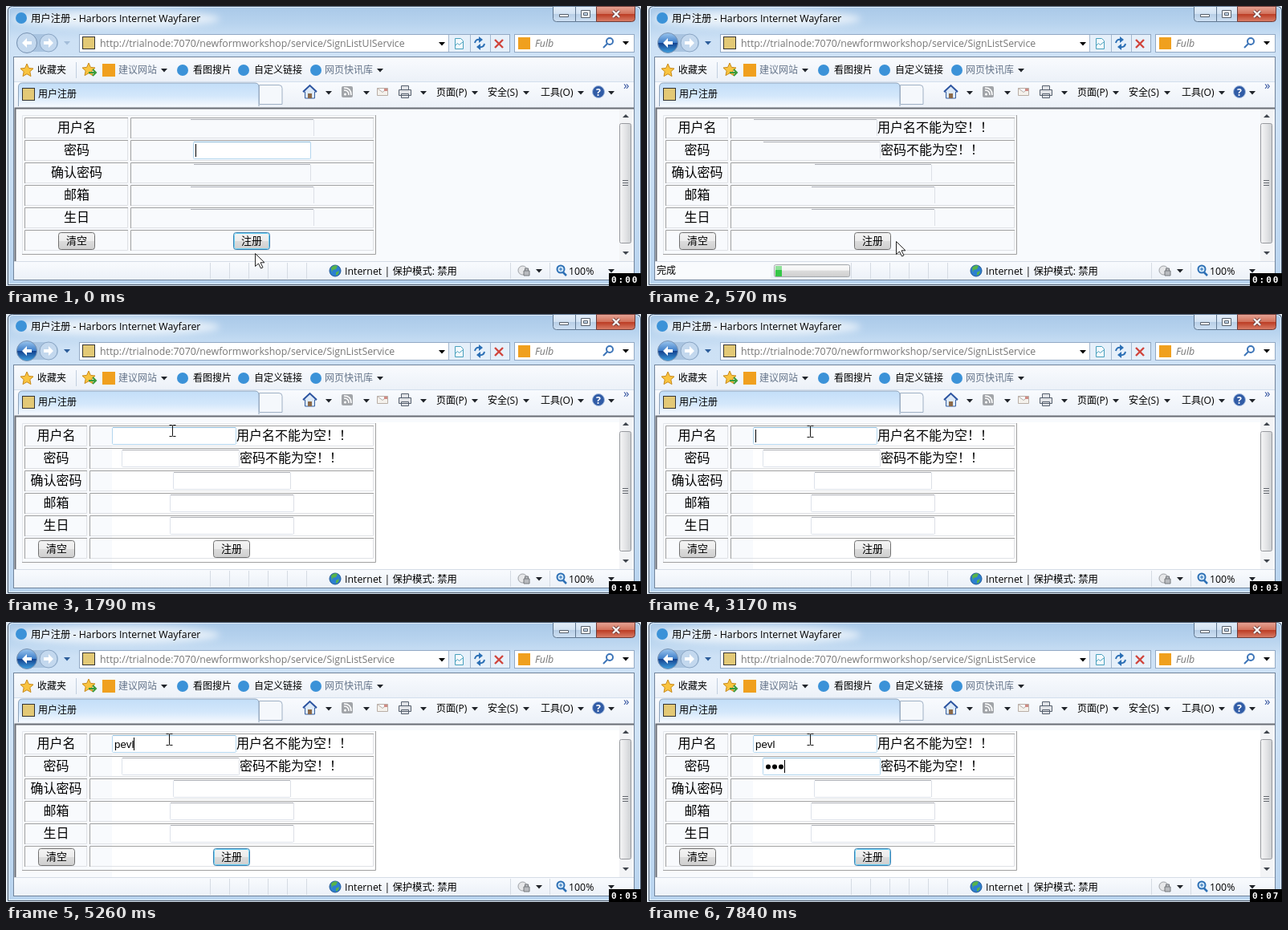
An HTML page that plays this animation: 791x349 px, repeating every 8000 ms.

```html
<!DOCTYPE html>
<html lang="zh-CN">
<head>
<meta charset="utf-8">
<title>用户注册</title>
<style>
html, body { margin: 0; width: 100%; height: 100%; overflow: hidden; background: #dfe8f1 }
svg { display: block }
text { font: 12.35px "Open Sans", "Noto Sans CJK SC", "Noto Sans CJK", sans-serif; white-space: pre }
.ui text { font-size: 12px }
.soft { fill: #66758a }
.url { fill: #777 }
.form text { font: 300 16px "Noto Sans CJK SC", "Noto Sans CJK", sans-serif }
.form .label { text-anchor: middle; font-size: 13px; font-weight: 400 }
.form .cap { text-anchor: middle }
.cell { fill: none; stroke: #a0a0a0 }
.cell.lit { stroke: #dfe1e5 }
.box rect { fill: #fff; stroke: #dde2ea }
.box path { fill: none; stroke: #abadb3 }
.box .side { stroke: #dcdfe6 }
.dirty rect { display: none }
.hot rect { stroke: #b3d6ee }
.hot path { stroke: #8dbbd9 }
.hot .side { stroke: #b3d6ee }
.btn rect { fill: url(#face); stroke: #707070 }
.btn .glow { fill: none; stroke: none }
.focus rect { stroke: #3c7fb1 }
.focus .glow { stroke: #6fd2f4 }
#name { font: 13.33px "Liberation Sans", sans-serif }
#clock { font: bold 11px "DejaVu Sans Mono", monospace; letter-spacing: 2px; fill: #fff }
</style>
</head>
<body>
<svg width="791" height="349" viewBox="0 0 791 349">
<defs>
  <linearGradient id="frame" x2="0" y2="1">
    <stop stop-color="#a9c8e8"/><stop offset=".06" stop-color="#b7d3ee"/>
    <stop offset=".12" stop-color="#cde1f5"/><stop offset=".4" stop-color="#d0e3f6"/>
    <stop offset="1" stop-color="#b9d4ef"/>
  </linearGradient>
  <linearGradient id="face" x2="0" y2="1">
    <stop stop-color="#f3f3f3"/><stop offset=".49" stop-color="#ececec"/>
    <stop offset=".5" stop-color="#dcdcdc"/><stop offset="1" stop-color="#cfcfcf"/>
  </linearGradient>
  <linearGradient id="bar" x2="0" y2="1">
    <stop stop-color="#f9fbfe"/><stop offset="1" stop-color="#ecf1f8"/>
  </linearGradient>
  <linearGradient id="tab" x2="0" y2="1">
    <stop stop-color="#c3def8"/><stop offset=".55" stop-color="#d3e7fb"/><stop offset="1" stop-color="#f5f9fe"/>
  </linearGradient>
  <linearGradient id="win" x2="0" y2="1">
    <stop stop-color="#e4eef9"/><stop offset=".48" stop-color="#d2e2f3"/>
    <stop offset=".5" stop-color="#b7cee6"/><stop offset="1" stop-color="#cfe1f4"/>
  </linearGradient>
  <linearGradient id="shut" x2="0" y2="1">
    <stop stop-color="#e6a596"/><stop offset=".48" stop-color="#d2725c"/>
    <stop offset=".5" stop-color="#bb3a22"/><stop offset="1" stop-color="#d9806a"/>
  </linearGradient>
  <linearGradient id="blue" x2="0" y2="1">
    <stop stop-color="#9cc6ee"/><stop offset=".48" stop-color="#3f7fca"/>
    <stop offset=".5" stop-color="#123f8c"/><stop offset="1" stop-color="#3fa0e0"/>
  </linearGradient>
  <linearGradient id="thumb">
    <stop stop-color="#f5f5f6"/><stop offset=".5" stop-color="#e4e5e7"/><stop offset="1" stop-color="#cccfd2"/>
  </linearGradient>
  <filter id="blur" x="-20%" y="-100%" width="140%" height="300%"><feGaussianBlur stdDeviation="5"/></filter>
  <path id="tri" d="M-4-2h8L0 2.5z"/>
  <path id="star" d="M0-8 2.4-2.6 8-2 3.8 1.8 5 7.6 0 4.7-5 7.6-3.8 1.8-8-2-2.4-2.6z" fill="#f9c440" stroke="#c98a1a"/>
  <circle id="orb" r="7" fill="#3b92d8"/>
  <path id="arrow" d="M-6 0 0-6v4h6v4H0v4z" fill="#fff"/>
</defs>

<!-- window frame -->
<path d="M2.500 347.500V6q0-5.500 6-5.500H784q6.500 0 6.500 5.500V347.500z" fill="url(#frame)" stroke="#41536a"/>
<path d="M3.500 346.500V7q0-5.500 6-5.500H783q6.500 0 6.500 5.500V346.500z" fill="none" stroke="#e3effa"/>
<ellipse cx="136" cy="16" rx="130" ry="11" fill="#fff" opacity=".7" filter="url(#blur)"/>
<use href="#orb" x="19" y="15"/>
<text x="31" y="19.5">用户注册 - Harbors Internet Wayfarer</text>
<g stroke="#5f7690">
  <path d="M681.5.5h28v19h-24q-4 0-4-4z" fill="url(#win)"/>
  <path d="M709.5.5h26v19h-26z" fill="url(#win)"/>
  <path d="M735.5.5h48v15q0 4-4 4h-44z" fill="url(#shut)" stroke="#6d3b38"/>
</g>
<g fill="#fff" stroke="#56606c">
  <path d="M689.5 10.5h11v3h-11z"/>
  <path d="M716.5 5.5h11v9h-11zm3 3v3h5v-3z" fill-rule="evenodd"/>
</g>
<path d="m756 6 8 8m0-8-8 8" stroke="#6b3a38" stroke-width="4"/>
<path d="m756 6 8 8m0-8-8 8" stroke="#fff" stroke-width="2.4"/>

<!-- navigation row -->
<rect x="13" y="35" width="52" height="22" rx="11" fill="#a9c4e0"/>
<circle id="back" cx="26" cy="46" r="12.5" stroke="#7892b2"/>
<use href="#arrow" x="26" y="46"/>
<circle cx="53" cy="46" r="11" fill="#c3d8ee" stroke="#8ba6c4"/>
<use href="#arrow" transform="translate(53 46)scale(-1 1)"/>
<use id="history" href="#tri" x="76" y="46"/>
<rect x="91.5" y="35.5" width="536" height="22" fill="#fff" stroke="#92a9c4"/>
<path d="M552 36h75v21h-75z" fill="#e6f0fa"/>
<path d="M551.5 36v21m27-21v21m25-21v21" stroke="#a3b8d0"/>
<rect x="95.5" y="38.5" width="15" height="15" fill="#e3c976" stroke="#333"/>
<text id="url" class="url" x="117" y="51"></text>
<use href="#tri" x="543" y="47"/>
<path d="M559.5 40.5h7l3 3v10h-10zm0 9 3-3 2 2 5-4" fill="#f5fafd" stroke="#48a0bd"/>
<path d="M584 46q1-5 6-4M596 47q-1 5-6 4" fill="none" stroke="#2b6fb5" stroke-width="2"/>
<path d="m589 38 5 4-5 4zm2 9-5 4 5 4z" fill="#2b6fb5"/>
<path d="m609 42 10 10m0-10-10 10" stroke="#d0453c" stroke-width="2.4"/>
<rect x="633.5" y="35.5" width="149" height="22" fill="#fff" stroke="#92a9c4"/>
<rect x="638" y="39" width="15" height="15" fill="#f0a01e"/>
<text x="659" y="51" class="url" style="font-style:italic">Fulb</text>
<g fill="none" stroke="#3d75b8" stroke-width="2"><circle cx="752" cy="44" r="4"/><path d="m749 47-5 5"/></g>
<use href="#tri" x="772" y="46"/>

<!-- toolbars -->
<rect x="9.5" y="63.5" width="773" height="278" fill="#edf3fa" stroke="#71849b"/>
<rect x="10" y="64" width="772" height="30" fill="url(#bar)"/>
<rect x="10" y="94" width="772" height="33" fill="url(#bar)"/>
<path d="M10 94.5h772" stroke="#d3dfed"/>
<path d="M87.5 70v20" stroke="#c2cfdf"/>
<use href="#star" x="26" y="80"/>
<use href="#star" x="103" y="79"/>
<path d="M103 83h9m-4-4 4 4-4 4" fill="none" stroke="#3a9b39" stroke-width="2"/>
<rect x="120" y="72" width="16" height="16" fill="#f0a01e"/>
<use href="#orb" x="220" y="80"/><use href="#orb" x="296" y="80"/><use href="#orb" x="386" y="80"/>
<path d="M15.5 125V101q0-5 5-5H310q5 0 5 5v24" fill="url(#tab)" stroke="#8fa3ba"/>
<path d="M315.5 122.5V98.5H340q4 0 4 4v20z" fill="#f5f8fc" stroke="#9fb0c4"/>
<rect x="20.5" y="102.5" width="15" height="15" fill="#e3c976" stroke="#333"/>
<g class="ui">
  <text x="39" y="84">收藏夹</text>
  <text x="140" y="84" class="soft">建议网站</text>
  <text x="233" y="84">看图搜片</text>
  <text x="309" y="84">自定义链接</text>
  <text x="397" y="84" class="soft">网页快讯库</text>
  <text x="40" y="114">用户注册</text>
  <text x="536" y="112">页面(P)</text>
  <text x="600" y="112">安全(S)</text>
  <text x="666" y="112">工具(O)</text>
  <text x="769" y="104" fill="#2d4d9b" style="font-size:15px">»</text>
</g>
<path d="m370.5 107 8-8 8 8h-2v8h-12v-8z" fill="#dce9f8" stroke="#355d9d"/>
<path d="m370 107 8.5-8 8.5 8" fill="none" stroke="#2c54a0" stroke-width="2"/>
<path d="M376 109h5v6h-5z" fill="#8c6a48"/>
<rect x="418" y="100" width="14" height="14" rx="2" fill="#a2a5a9"/>
<path d="M421 105q6 0 6 6m-6-9q9 0 9 9" fill="none" stroke="#fff" stroke-width="1.5"/>
<circle cx="422.5" cy="110" r="1.5" fill="#fff"/>
<path d="M462.5 102.5h13v9h-13zl6.5 5 6.5-5" fill="#f4f1ec" stroke="#b9aea6"/>
<path d="M471 103h4v3h-4z" fill="#d08a84"/>
<path d="M492.5 99.5h9v5h-9zm-3 5h15v7h-15zm3 5h9v5h-9z" fill="#e1e3e7" stroke="#555f6d"/>
<circle cx="738" cy="107" r="7.5" fill="#315ca6" stroke="#a9bfe0"/>
<text x="738" y="112" fill="#fff" text-anchor="middle" style="font-weight:700">?</text>

<!-- page -->
<rect x="11" y="127" width="771" height="191" fill="#f8fafd"/>
<path d="M11.5 318V127.5H782" fill="none" stroke="#696d74" stroke-width="2"/>
<rect id="cleanLow" x="132" y="204" width="632" height="114" fill="#fff"/>
<rect id="cleanTop" x="132" y="135" width="632" height="69" fill="#fff"/>
<rect x="764" y="129" width="16" height="189" fill="#f3f4f6"/>
<rect x="764.5" y="146.5" width="14" height="149" rx="2" fill="url(#thumb)" stroke="#97999e"/>
<path d="M768 217.5h7m-7 3h7m-7 3h7" stroke="#62666d"/>
<path d="m768 139 4-4 4 4zm0 167 4 4 4-4z" fill="#3f444c"/>
<g id="forms"></g>
<text id="name" x="135" y="157"></text>
<g id="dots"></g>
<rect id="caret" width="1" height="16"/>

<!-- status bar -->
<rect x="10" y="318" width="772" height="23" fill="url(#bar)"/>
<path d="M10 318.5h772" stroke="#d5dce6"/>
<g id="status">
  <rect x="12" y="320" width="142" height="20" fill="#f9fbfd"/>
  <text x="12" y="334" style="font-size:12px">完成</text>
</g>
<path id="seps" stroke="#d5dbe3"/>
<g id="progress">
  <rect x="158.5" y="322.5" width="94" height="15" rx="2" fill="url(#face)" stroke="#a5a9ad"/>
  <rect id="fill" x="160" y="324" height="13" fill="#35c747"/>
  <path d="M160 324h92v5h-92z" fill="#fff" opacity=".45"/>
</g>
<circle cx="410" cy="330" r="7" fill="#2c7fd0" stroke="#1f5798"/>
<path d="M405 326q4-4 8-2l-2 4-4 1-1 3zm6 6 4-2-1 4-3 2z" fill="#57b34a"/>
<text x="422" y="334.5">Internet | 保护模式: 禁用</text>
<circle cx="643.5" cy="329.5" r="5.5" fill="#e6e7e9" stroke="#9a9da2"/>
<path d="M645 330h7v6h-7zm1.5 0v-3h4v3" fill="#b9bbbf" stroke="#75787d"/>
<circle cx="691" cy="328" r="4.5" fill="#d7ebfb" stroke="#2d70b5" stroke-width="2"/>
<path d="m694 332 4 4" stroke="#2d70b5" stroke-width="2.5"/>
<path d="M689 328h4m-2-2v4" stroke="#2d70b5"/>
<text x="701" y="334.5">100%</text>
<g id="tris" fill="#1f2329"></g>
<path id="beam" d="M-4-7h3q1 0 1 1 0-1 1-1h3M0-6v12M-4 7h3q1 0 1-1 0 1 1 1h3" fill="none" stroke="#111"/>
<path id="pointer" d="M0 0v16l4-3.5 3 6 2.5-1.200-3-6h5z" fill="#fff" stroke="#222"/>
<rect x="751" y="333" width="40" height="16"/>
<text id="clock" x="754" y="345"></text>
</svg>
<script>
const $ = id => document.getElementById(id);
const show = (el, on) => el.style.display = on ? '' : 'none';
const steps = (t, times) => times.filter(s => t >= s).length;

const captions = ['用户名', '密码', '确认密码', '邮箱', '生日'];
const widths = [155, 147, 147, 155, 155];

// sunken table cell: dark top and left, light right and bottom
const cell = (x, y, right) => `
  <path class="cell lit" d="M${x} ${y + 25.5}H${right - 1.5}V${y}"/>
  <path class="cell" d="M${x + .5} ${y + 26}V${y + .5}H${right - 1}"/>`;

const box = (x, y, w) => `<g class="box">
  <rect x="${x + .5}" y="${y + .5}" width="${w - 1}" height="21" rx="1"/>
  <path d="M${x + 1} ${y + .5}h${w - 2}"/>
  <path class="side" d="M${x + w - .5} ${y + 1}v20"/></g>`;

const button = (x, label) => `<g class="btn">
  <rect x="${x + .5}" y="282.5" width="45" height="21" rx="3"/>
  <rect class="glow" x="${x + 1.5}" y="283.5" width="43" height="19" rx="2"/>
  <text class="label" x="${x + 23}" y="296.5">${label}</text></g>`;

function form(split, xs, clearX, sendX, errors) {
  let s = '<g class="form"><path d="M20.5 309V136.5H460" fill="none" stroke="#e4e7ec"/>' +
    '<path d="M20 309.5H460.5V136" fill="none" stroke="#a0a0a0"/>';
  for (let i = 0; i < 6; i++) {
    const y = 139 + 28 * i;
    s += cell(23, y, split) + cell(split + 2, y, 459);
    if (i > 4) continue;
    s += `<text class="cap" x="${(23 + split) / 2}" y="${y + 18}">${captions[i]}</text>` + box(xs[i], y + 2, widths[i]);
    if (errors && i < 2) s += `<text x="${xs[i] + widths[i]}" y="${y + 18}">${captions[i]}不能为空！！</text>`;
  }
  return s + button(clearX, '清空') + button(sendX, '注册') + '</g>';
}

$('forms').innerHTML =
  form(153, [229, 233, 233, 229, 229], 65, 283, false) +
  form(102, [132, 144, 208, 204, 204], 40, 258, true);
const [first, second] = $('forms').children;
const boxes = [first, second].map(f => f.querySelectorAll('.box'));
const send = [first, second].map(f => f.querySelectorAll('.btn')[1]);

$('tris').innerHTML = [[197, 80], [466, 80], [402, 108], [449, 108], [520, 108], [584, 108], [648, 108],
  [716, 108], [754, 108], [664, 330], [754, 330]].map(([x, y]) => `<use href="#tri" x="${x}" y="${y}"/>`).join('');
$('seps').setAttribute('d', [254, 278, 302, 326, 350, 374, 628, 677].map(x => `M${x}.5 320v20`).join(''));
$('dots').innerHTML = [0, 1, 2].map(i => `<circle cx="${151 + 8 * i}" cy="180.5" r="3"/>`).join('');

// time, x, y
const moves = [[0, 310, 308], [130, 310, 293], [1380, 288, 262], [1510, 258, 215], [1660, 232, 178],
  [1790, 207, 145], [1950, 205, 147], [2050, 203, 146], [2200, 202, 139], [2330, 200, 140],
  [2480, 204, 145], [2610, 208, 146], [2760, 206, 147], [2890, 203, 146]];

function draw(t) {
  const loaded = t >= 440;
  show(first, !loaded);
  show(second, loaded);
  $('url').textContent = `http://trialnode:7070/newformworkshop/service/SignList${loaded ? '' : 'UI'}Service`;
  $('back').setAttribute('fill', loaded ? 'url(#blue)' : '#c3d8ee');
  $('history').setAttribute('fill', loaded ? '#2b5c99' : '#a3bdd9');

  boxes[0].forEach((b, i) => b.setAttribute('class', i === 1 && t < 130 ? 'box hot' : 'box dirty'));
  boxes[1].forEach((b, i) => {
    const hot = i === 0 && t >= 1790 || i === 1 && t >= 5360;
    const dirty = t < (i < 2 ? 1660 : 1380);
    b.setAttribute('class', 'box' + (hot ? ' hot' : dirty ? ' dirty' : ''));
  });
  send[0].setAttribute('class', 'btn focus');
  send[1].setAttribute('class', t >= 4040 ? 'btn focus' : 'btn');
  show($('cleanLow'), t >= 1380);
  show($('cleanTop'), t >= 1660);

  show($('status'), t >= 130 && t < 1380);
  show($('progress'), loaded && t < 1100);
  $('fill').setAttribute('width', [0, 8, 32, 62, 92][steps(t, [570, 720, 850, 950])]);

  $('name').textContent = 'pevl'.slice(0, steps(t, [4040, 4420, 4550, 4700]));
  const secret = steps(t, [7020, 7310, 7840]);
  [...$('dots').children].forEach((d, i) => show(d, i < secret));

  let x = 236, y = 172;
  if (t >= 5360) x = 147 + 8 * secret;
  else if (loaded) {
    x = 135 + Math.round($('name').getComputedTextLength());
    y = 144;
  }
  $('caret').setAttribute('x', x);
  $('caret').setAttribute('y', y);
  show($('caret'), steps(t, [130, 2760, 3730, 4040, 5930, 6360]) % 2 === 0);

  const [since, mx, my] = moves[steps(t, moves.map(m => m[0])) - 1];
  const beam = since >= 1790;
  show($('beam'), beam);
  show($('pointer'), !beam);
  $(beam ? 'beam' : 'pointer').setAttribute('transform', `translate(${mx + .5} ${my + .5})`);
  $('clock').textContent = '0:0' + steps(t, [950, 2050, 3170, 4170, 5260, 6460, 7460]);
}

const start = performance.now();
function tick() {
  draw((performance.now() - start) % 8000);
  requestAnimationFrame(tick);
}
tick();
</script>
</body>
</html>
```
